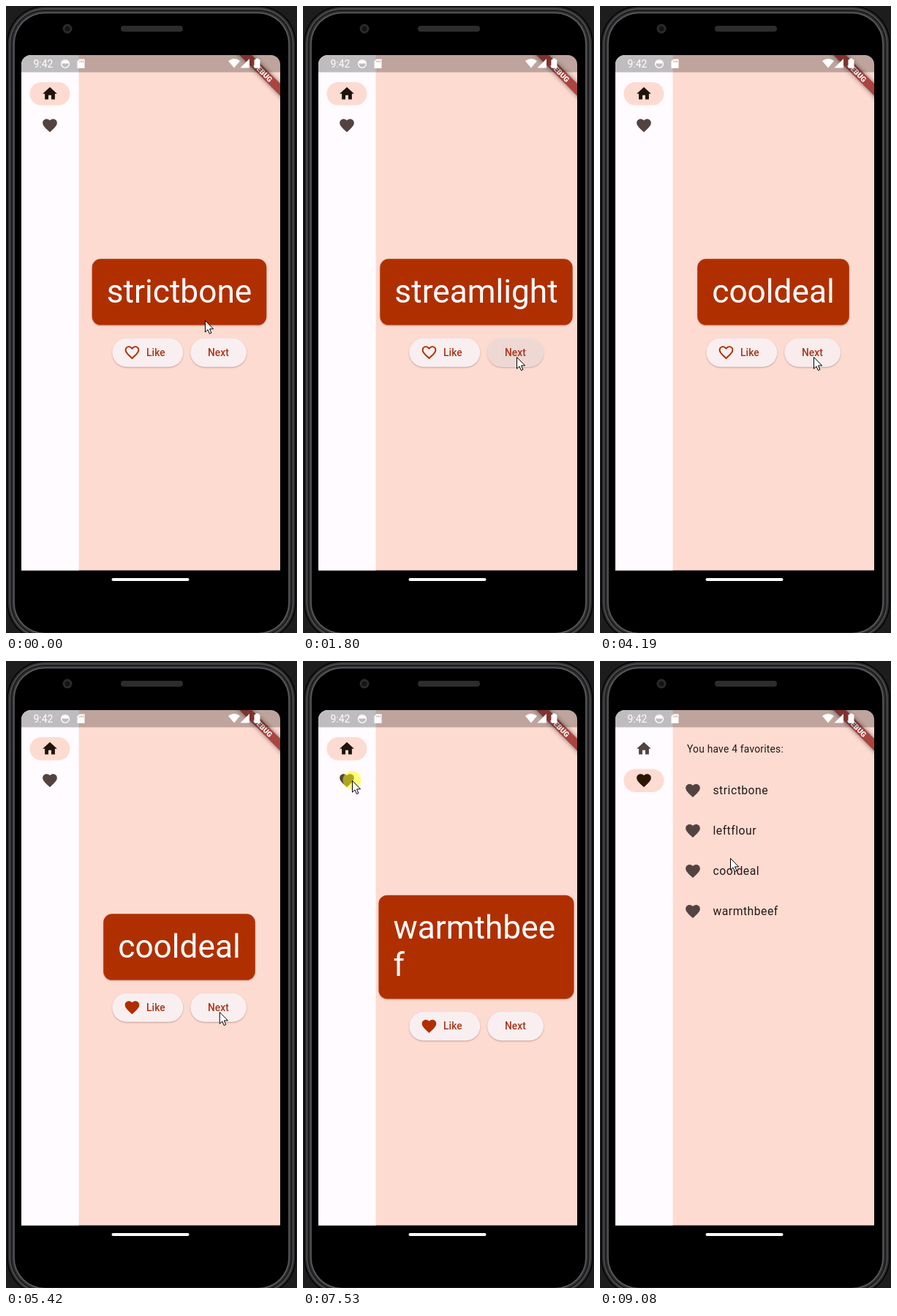
An HTML page with a canvas that plays this animation: 398x856 px, repeating every 9210 ms.

```html
<!DOCTYPE html>
<html lang="en">
<head>
<meta charset="utf-8">
<style>
html, body { margin: 0; width: 100%; height: 100%; overflow: hidden; background: #1d1d1e; }
canvas { display: block; }
</style>
</head>
<body>
<canvas id="stage" width="398" height="856"></canvas>
<script>
const ctx = document.getElementById('stage').getContext('2d');
const LOOP = 9210, PAGE_AT = 7940, TAP_DELAY = 120, SCALE = 0.983;
const PINK = '#fddbd1', RUST = '#b02f00', BROWN = '#534340', DARK = '#231917', WHITE = '#fffbff';

const HEART_D = 'M12 21.35l-1.45-1.32C5.4 15.36 2 12.28 2 8.5 2 5.42 4.42 3 7.5 3c1.74 0 3.41.81 4.5 2.09C13.09 3.81 14.76 3 16.5 3 19.58 3 22 5.42 22 8.5c0 3.78-3.4 6.86-8.55 11.54z';
const HEART = new Path2D(HEART_D);
const HEART_LINE = new Path2D(HEART_D + 'M12.1 18.55l-.1.1-.1-.1C7.14 14.24 4 11.39 4 8.5 4 6.5 5.5 5 7.5 5c1.54 0 3.04.99 3.57 2.36h1.87C13.46 5.99 14.96 5 16.5 5c2 0 3.5 1.5 3.5 3.5 0 2.89-3.14 5.74-7.9 10.05z');
const HOME = new Path2D('M10 20v-6h4v6h5v-8h3L12 3 2 12h3v8z');
const ARROW = new Path2D('M.5 .5V16.2L4 12.9 6.4 18.5 8.9 17.4 6.5 11.9H11.6Z');

const WORDS = ['strictbone', 'streamlight', 'lightstone', 'leftflour', 'cooldeal', 'warmthbeef'];
const SPOTS = {
  start: [272, 429], like: [186, 475], next: [292, 479],
  lowLike: [177, 496], rail: [67, 163], rest: [178, 269]
};
const tap = (at, spot, kind = spot) => ({ at, spot: SPOTS[spot], kind });
const TAPS = [
  tap(780, 'like'), tap(1500, 'next'), tap(1810, 'next'), tap(2200, 'next'),
  tap(2990, 'like'), tap(3720, 'next'), tap(4760, 'like'), tap(5580, 'next'),
  tap(6070, 'lowLike', 'like'), tap(7530, 'rail'), tap(9230, 'rest')
];

const clamp = v => Math.max(0, Math.min(1, v));
const smooth = v => v * v * (3 - 2 * v);

// Milliseconds since the latest tap, optionally of one kind
function tapAge(t, kind) {
  const past = TAPS.filter(p => p.at <= t && (!kind || p.kind === kind));
  return past.length ? t - past.at(-1).at : Infinity;
}

function stateAt(t) {
  let index = 0;
  const liked = new Set();
  for (const { at, kind } of TAPS) {
    if (at + TAP_DELAY > t) break;
    if (kind === 'next') index++;
    if (kind === 'like') liked.add(WORDS[index]);
  }
  return { word: WORDS[index], liked };
}

// The pointer reaches each spot shortly before its tap
function pointerAt(t) {
  let [x, y] = SPOTS.start, free = 0;
  for (const { at, spot } of TAPS) {
    const dx = spot[0] - x, dy = spot[1] - y, end = at - 150;
    const begin = Math.max(free, end - 200 - 1.3 * Math.hypot(dx, dy));
    if (t < end) {
      const k = smooth(clamp((t - begin) / (end - begin)));
      return [x + dx * k, y + dy * k];
    }
    [x, y] = spot;
    free = at + 150;
  }
  return [x, y];
}

function box(x, y, w, h, r, fill) {
  ctx.fillStyle = fill;
  ctx.beginPath();
  ctx.roundRect(x, y, w, h, r);
  ctx.fill();
}

function disc(x, y, r, fill) {
  ctx.fillStyle = fill;
  ctx.beginPath();
  ctx.arc(x, y, r, 0, 7);
  ctx.fill();
}

function poly(points, fill) {
  ctx.fillStyle = fill;
  ctx.beginPath();
  points.forEach(p => ctx.lineTo(...p));
  ctx.fill();
}

function setFont(size, weight = 400, spacing = 0) {
  ctx.font = `${weight} ${size * SCALE}px Roboto, sans-serif`;
  ctx.letterSpacing = spacing + 'px';
}

function text(str, x, y, size, fill, { weight, spacing, align = 'left' } = {}) {
  setFont(size, weight, spacing);
  ctx.textAlign = align;
  ctx.fillStyle = fill;
  ctx.fillText(str, x, y);
}

function icon(path, x, y, fill) {
  ctx.save();
  ctx.translate(x, y);
  ctx.scale(SCALE, SCALE);
  ctx.translate(-12, -12);
  ctx.fillStyle = fill;
  ctx.fill(path, 'evenodd');
  ctx.restore();
}

function raised(x, y, w, h, r, fill) {
  ctx.save();
  ctx.shadowColor = 'rgba(60,20,10,.3)';
  ctx.shadowBlur = 2;
  ctx.shadowOffsetY = 1;
  box(x, y, w, h, r, fill);
  ctx.restore();
}

function phone() {
  box(0, 0, 398, 856, 0, '#1d1d1e');
  ['#070708', '#2c2c2e', '#4a4b4d', '#1a1a1b', '#303032', '#58595c', '#000'].forEach((shade, i) => {
    const inset = 1 + i * 1.8;
    box(inset, inset - 1.5, 398 - 2 * inset, 869 - 2 * inset, 53 - inset, shade);
  });
  disc(84, 31, 6.5, '#2b2b2c');
  disc(84, 31, 3.5, '#141418');
  box(157, 27, 85, 8, 4, '#2d2d2e');
  box(144.5, 781, 106, 4, 2, '#fff');
}

function debugBanner() {
  ctx.save();
  ctx.translate(375, 67);
  ctx.rotate(Math.PI / 4);
  ctx.shadowColor = 'rgba(0,0,0,.5)';
  ctx.shadowBlur = 6;
  box(-50, 27.5, 100, 11.8, 0, '#aa443f');
  ctx.shadowBlur = 0;
  text('DEBUG', 0, 37, 10.2, '#fff', { weight: 900, align: 'center' });
  ctx.restore();
}

function statusBar() {
  box(21, 67, 354, 23.5, 0, 'rgba(0,0,0,.25)');
  text('9:42', 37.5, 84, 14.2, '#fff');

  ctx.strokeStyle = '#fff';
  ctx.lineWidth = 1.4;
  ctx.beginPath();
  ctx.arc(81, 79, 5.4, 0, 7);
  ctx.stroke();
  box(76.5, 74.5, 9, 4, [4, 4, 0, 0], '#fff');

  poly([[100.5, 72.5], [107.5, 72.5], [107.5, 85], [97.5, 85], [97.5, 75.5]], '#fff');
  for (let i = 0; i < 3; i++) box(100.5 + i * 2.2, 74.5, 1.1, 2.6, 0, '#bfa8a8');

  ctx.fillStyle = '#fff';
  ctx.beginPath();
  ctx.moveTo(312, 84.5);
  ctx.lineTo(304, 75);
  ctx.quadraticCurveTo(312, 69, 320, 75);
  ctx.fill();
  poly([[333, 72], [333, 84.5], [320.5, 84.5]], '#fff');
  box(339.5, 73, 8, 11.8, 1, '#fff');
  box(341.5, 71.5, 4, 2, 0, '#fff');
}

function rail(t) {
  box(21, 67, 78.6, 704, 0, WHITE);
  const k = smooth(clamp((t - PAGE_AT) / 200));
  const pill = (y, grow) => {
    ctx.globalAlpha = grow;
    box(60 - 27.5 * grow, y - 15.7, 55 * grow, 31.4, 15.7, PINK);
    ctx.globalAlpha = 1;
  };
  pill(119.8, 1 - k);
  pill(163.2, k);
  icon(HOME, 60, 119.7, k < 0.5 ? '#1f130a' : BROWN);
  icon(HEART, 60, 163, k < 0.5 ? BROWN : '#2b1600');
}

function button(x, y, w, label, labelX, age) {
  raised(x, y, w, 39.3, 19.6, '#f9eff0');
  ctx.globalAlpha = Math.min(clamp(age / 100), clamp((500 - age) / 200));
  box(x, y, w, 39.3, 19.6, '#eed8d4');
  ctx.globalAlpha = 1;
  text(label, labelX, y + 24.5, 14, '#a8361a', { weight: 500, spacing: 0.1 });
}

function wrap(word, limit) {
  let end = word.length;
  while (ctx.measureText(word.slice(0, end)).width > limit) end--;
  return end < word.length ? [word.slice(0, end), word.slice(end)] : [word];
}

function homePage(t) {
  const { word, liked } = stateAt(t);
  const limit = 227, pad = 20, lineHeight = 51.1;
  setFont(45);
  const lines = wrap(word, limit);
  const width = 2 * pad + (lines.length > 1 ? limit : ctx.measureText(word).width);
  const shift = (lines.length - 1) * lineHeight / 2;
  const left = 237 - width / 2, top = 345.2 - shift;
  raised(left, top, width, 90.4 + shift * 2, 11.8, RUST);
  lines.forEach((line, i) => text(line, left + pad, Math.floor(top + 60.1 + i * lineHeight), 45, '#fff'));

  const y = 453.4 + shift;
  button(145.3, y, 97, 'Like', 192, tapAge(t, 'like'));
  icon(liked.has(word) ? HEART : HEART_LINE, 172.5, y + 19.6, RUST);
  button(252.2, y, 76.8, 'Next', 276, tapAge(t, 'next'));
}

function favoritesPage(t) {
  const favorites = [...stateAt(t).liked];
  text(`You have ${favorites.length} favorites:`, 119, 125, 14, DARK, { spacing: 0.25 });
  favorites.forEach((word, i) => {
    const y = 176.8 + i * 55;
    icon(HEART, 127, y, BROWN);
    text(word, 154.5, y + 5.2, 16, DARK, { spacing: 0.5 });
  });
}

function pointer(t) {
  const [x, y] = pointerAt(t);
  if (tapAge(t) < 220) disc(x, y - 0.5, 12.5, 'rgba(255,255,0,.52)');
  ctx.save();
  ctx.translate(x, y);
  ctx.fillStyle = '#fff';
  ctx.fill(ARROW);
  ctx.strokeStyle = '#000';
  ctx.lineWidth = 1;
  ctx.stroke(ARROW);
  ctx.restore();
}

function draw(t) {
  phone();
  ctx.save();
  ctx.beginPath();
  ctx.roundRect(21, 67, 354, 703.5, [13, 13, 0, 0]);
  ctx.clip();
  box(21, 67, 354, 704, 0, PINK);
  rail(t);
  if (t < PAGE_AT) homePage(t);
  else favoritesPage(t);
  debugBanner();
  statusBar();
  ctx.restore();
  pointer(t);
}

const start = performance.now();
function tick() {
  draw((performance.now() - start) % LOOP);
  requestAnimationFrame(tick);
}
tick();
</script>
</body>
</html>
```
